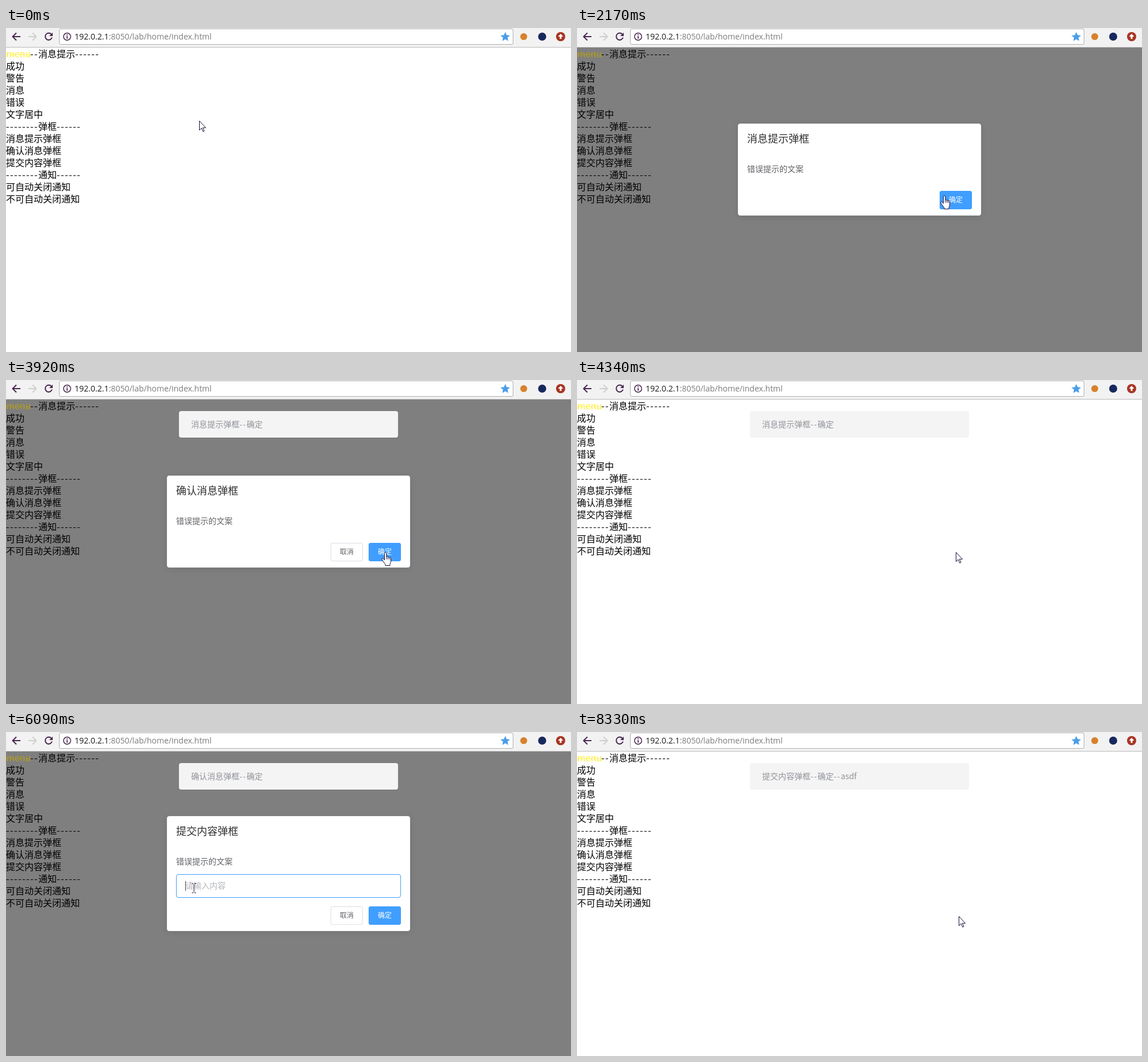
Write an HTML page that moves like this. It is 980 px wide and 563 px high and loops after 8400 ms.

```html
<!DOCTYPE html>
<html lang="zh">
<head>
<meta charset="utf-8">
<title>消息提示</title>
<style>
  html, body { margin: 0; width: 100%; height: 100%; overflow: hidden; background: #fff; }
  body { position: relative; font-family: "Noto Sans CJK SC", "Noto Sans CJK", sans-serif; }
  body *, body *::before { box-sizing: border-box; }
  i { font-style: normal; letter-spacing: .09em; }
  svg { position: absolute; left: 0; top: 0; overflow: visible; }

  .bar { position: absolute; left: 0; top: 0; width: 980px; height: 34px; background: #f2f2f2; border-bottom: 1px solid #b9b9b9; }
  .url { position: absolute; left: 92px; top: 1px; width: 788px; height: 28px; padding-left: 26px; border: 1px solid #aeaeae; border-radius: 3px;
    background: #fff; color: #7d7d7d; font: 14px/26px "Open Sans", "Noto Sans", sans-serif; white-space: nowrap; }
  .url b { font-weight: 400; color: #1c1c1c; }

  .page { position: absolute; left: 0; top: 34px; width: 980px; height: 529px; overflow: hidden; }
  .list { position: absolute; left: 0; top: 0; font-size: 16px; line-height: 21px; color: #000; white-space: nowrap; }
  .list div { height: 21px; }
  .list div:first-child { padding-left: 42px; }
  .menu { position: absolute; left: 0; top: 0; font-size: 16px; line-height: 21px; white-space: nowrap; }
  .menu::before { content: "------"; position: absolute; left: 0; letter-spacing: .09em; }
  .mask { position: absolute; inset: 0; background: rgba(0, 0, 0, .5); }

  .dialog { position: absolute; left: 279px; top: 132px; width: 422px; height: 160px; background: #fff; border: 1px solid #ebeef5;
    border-radius: 4px; box-shadow: 0 2px 12px rgba(0, 0, 0, .1); }
  .dialog.prompt { top: 112px; height: 200px; }
  .dialog > * { position: absolute; white-space: nowrap; }
  .title { left: 15px; top: 11px; font-size: 18px; line-height: 26px; color: #303133; }
  .message { left: 15px; top: 65px; font-size: 14px; line-height: 24px; color: #606266; }
  .btn { bottom: 10px; width: 56px; height: 32px; border: 1px solid #dcdfe6; border-radius: 3px; font-size: 12px; font-weight: 500;
    line-height: 28px; text-align: center; color: #606266; }
  .cancel { left: 283px; }
  .ok { left: 349px; background: #409eff; border-color: #409eff; color: #fff; }
  .input { display: none; left: 15px; top: 100px; width: 390px; height: 41px; border: 1px solid #dcdfe6; border-radius: 4px; padding-left: 15px;
    font-size: 14px; line-height: 37px; color: #606266; }
  .prompt .input { display: block; }
  .hint { color: #b4b6ba; }
  .typed { font: 14px/39px "Liberation Sans", Arial, sans-serif; }
  .caret { position: absolute; top: 11px; width: 1px; height: 17px; background: #444; }

  .toast { position: absolute; left: 300px; top: 20px; width: 380px; height: 46px; padding-left: 21px; border-radius: 4px;
    background: #f4f4f4; color: #909399; font-size: 14px; line-height: 44px; white-space: nowrap; }
  .cursor path { fill: #fff; stroke: #1c0c38; stroke-linejoin: round; }
</style>
</head>
<body>
<div class="bar">
  <div class="url"><b>192.0.2.1</b>:8050/lab/home/index.html</div>
  <svg width="980" height="34" fill="none" stroke="#4a2750" stroke-width="2">
    <path d="M25 15H12M18 8.5L11.5 15L18 21.5"/>
    <path d="M39 15H52M46 8.5L52.5 15L46 21.5" stroke="#cfcfcf"/>
    <path d="M78.6 10.8A6 6 0 1 0 79.8 16.5"/>
    <path d="M81 8v6h-6z" fill="#4a2750" stroke="none"/>
    <circle cx="106" cy="15" r="6.2" stroke-width="1.5"/>
    <path d="M106 14v4.5M106 11v1.8" stroke-width="1.8"/>
    <path d="M866 7l2.4 5.3 5.8.6-4.3 3.9 1.2 5.7-5.1-2.9-5.1 2.9 1.2-5.7-4.3-3.9 5.8-.6z" fill="#4b9fea" stroke="none"/>
    <circle cx="898" cy="15" r="6" fill="#d8812c" stroke="none"/>
    <circle cx="930" cy="15" r="7" fill="#17285c" stroke="none"/>
    <circle cx="962" cy="15" r="8" fill="#a93424" stroke="none"/>
    <path d="M962 10l4.5 5h-3v4h-3v-4h-3z" fill="#fff" stroke="none"/>
  </svg>
</div>

<div class="page">
  <div class="list"></div>
  <div class="mask"></div>
  <div class="menu">menu</div>
  <div class="dialog">
    <div class="title"></div>
    <div class="message">错误提示的文案</div>
    <div class="input"><span class="hint">请输入内容</span><span class="typed"></span><span class="caret"></span></div>
    <div class="btn cancel">取消</div>
    <div class="btn ok">确定</div>
  </div>
</div>

<svg class="cursor" width="1" height="1">
  <path id="arrow" d="M.5.5v16l3.7-3.5 2.6 6 2.2-1-2.6-5.7h5.1z"/>
  <g id="hand" transform="translate(-6 0)">
    <path d="M5.5 14V2.2a1.7 1.7 0 0 1 3.4 0V8.5a1.5 1.5 0 0 1 2.8.6a1.4 1.4 0 0 1 2.6.7a1.2 1.2 0 0 1 2.2.9V16c0 2-1.5 4-1.5 5.5v2H7v-2C5 18.5 2.5 15.5 1 12.8C.3 11 2.3 10.3 3.3 11.4z"/>
    <path d="M8.9 8.5v4M11.7 9.1v3.6M14.3 9.8v3"/>
  </g>
  <path id="beam" d="M-3.5-7.5H-1M1-7.5H3.5M0-6.5V7.5M-3.5 8.5H-1M1 8.5H3.5"/>
</svg>

<script>
const LOOP = 8400, STEP = 70;
const $ = s => document.querySelector(s);
const dashes = s => s.replace(/-+/g, '<i>$&</i>');
const clamp = v => Math.min(1, Math.max(0, v));
const span = (t, from, length) => clamp((t - from) / length);
const easeOut = p => 1 - (1 - p) ** 2;
const easeInOut = p => p * p * (3 - 2 * p);
const show = (el, on) => { el.style.display = on ? '' : 'none'; };

const lines = ['--消息提示------', '成功', '警告', '消息', '错误', '文字居中', '--------弹框------',
  '消息提示弹框', '确认消息弹框', '提交内容弹框', '--------通知------', '可自动关闭通知', '不可自动关闭通知'];
$('.list').innerHTML = lines.map(s => `<div>${dashes(s)}</div>`).join('');

const dialogs = [
  { from: 1330, to: 2310, title: '消息提示弹框', alert: true },
  { from: 3220, to: 4340, title: '确认消息弹框' },
  { from: 5390, to: 7910, title: '提交内容弹框', prompt: true }
];

const toasts = [
  { enter: 2350, leave: 5180, text: '消息提示弹框--确定' },
  { enter: 4380, leave: 6960, text: '确认消息弹框--确定' },
  { enter: 7950, leave: 9999, text: '提交内容弹框--确定--asdf' }
].map(toast => {
  const el = document.createElement('div');
  el.className = 'toast';
  el.innerHTML = dashes(toast.text);
  $('.page').append(el);
  return { ...toast, el };
});

// Pointer moves: start, end, bend point, destination
const home = [335, 161];
const moves = [
  [420, 1190, [150, 261], [60, 193]],
  [1400, 2170, [350, 280], [636, 291]],
  [2310, 2730, [300, 265], [50, 221]],
  [2800, 2940, [50, 218], [50, 215]],
  [3290, 3920, [350, 285], [657, 299]],
  [4410, 4900, [320, 280], [64, 240]],
  [5040, 5180, [65, 238], [66, 237]],
  [5390, 5950, [190, 262], [326, 271]],
  [6930, 7350, [500, 290], [657, 315]],
  [7420, 7560, [657, 318], [657, 320]],
  [7630, 7770, [660, 320], [662, 320]]
];

const keys = [[6440, 'a'], [6650, 'as'], [6720, 'asd'], [7000, 'asdf']];
const caretX = { '': 15, a: 23, as: 30, asd: 38, asdf: 42 };

function pointer(t) {
  let at = home;
  for (const [start, end, bend, goal] of moves) {
    if (t <= start) break;
    const p = easeInOut(span(t, start, end - start)), q = 1 - p;
    at = at.map((v, i) => Math.round(q * q * v + 2 * p * q * bend[i] + p * p * goal[i]));
  }
  return at;
}

function drawCursor(t, dialog) {
  const [x, y] = pointer(t);
  const drop = dialog && dialog.prompt ? 20 : 0;
  const inside = (l, top, r, b) => x >= l && x <= r && y >= top && y <= b;
  let kind = 'arrow';
  if (dialog && inside(629, 283 + drop, 685, 315 + drop)) kind = 'hand';
  else if (drop && inside(295, 247, 685, 288)) kind = 'beam';
  for (const id of ['arrow', 'hand', 'beam']) show($('#' + id), id === kind);
  $('.cursor').style.transform = `translate(${x}px, ${y}px)`;
}

function drawInput(t) {
  const [since, text] = keys.filter(k => t >= k[0]).pop() || [6020, ''];
  show($('.hint'), !text);
  $('.typed').textContent = text;
  const caret = $('.caret');
  caret.style.left = caretX[text] + 'px';
  show(caret, t >= since && t < 7770 && (t - since) % 980 < 490);
  const focus = span(t, 5950, 140) - span(t, 7770, 200);
  $('.input').style.borderColor = `color-mix(in srgb, #409eff ${focus * 100}%, #dcdfe6)`;
}

function drawToast(t, { enter, leave, el }) {
  show(el, t > enter && t < leave + 400);
  const lift = 1 - easeOut(span(t, enter, 400)) + easeOut(span(t, leave, 400));
  el.style.transform = `translateY(${-46 * lift}px)`;
  el.style.opacity = easeOut(span(t, enter, 300)) - easeOut(span(t, leave, 300));
}

function draw(t) {
  const dialog = dialogs.find(d => t >= d.from && t < d.to);
  const box = $('.dialog');
  show($('.mask'), dialog);
  show(box, dialog);
  if (dialog) {
    box.classList.toggle('prompt', !!dialog.prompt);
    $('.title').textContent = dialog.title;
    show($('.cancel'), !dialog.alert);
  }
  $('.menu').style.color = dialog ? '#b39c1c' : '#ffee38';
  drawInput(t);
  toasts.forEach(toast => drawToast(t, toast));
  drawCursor(t, dialog);
}

const start = performance.now();
function tick() {
  const t = (performance.now() - start + 2) % LOOP;
  draw(Math.floor(t / STEP) * STEP);
  requestAnimationFrame(tick);
}
tick();
</script>
</body>
</html>
```
